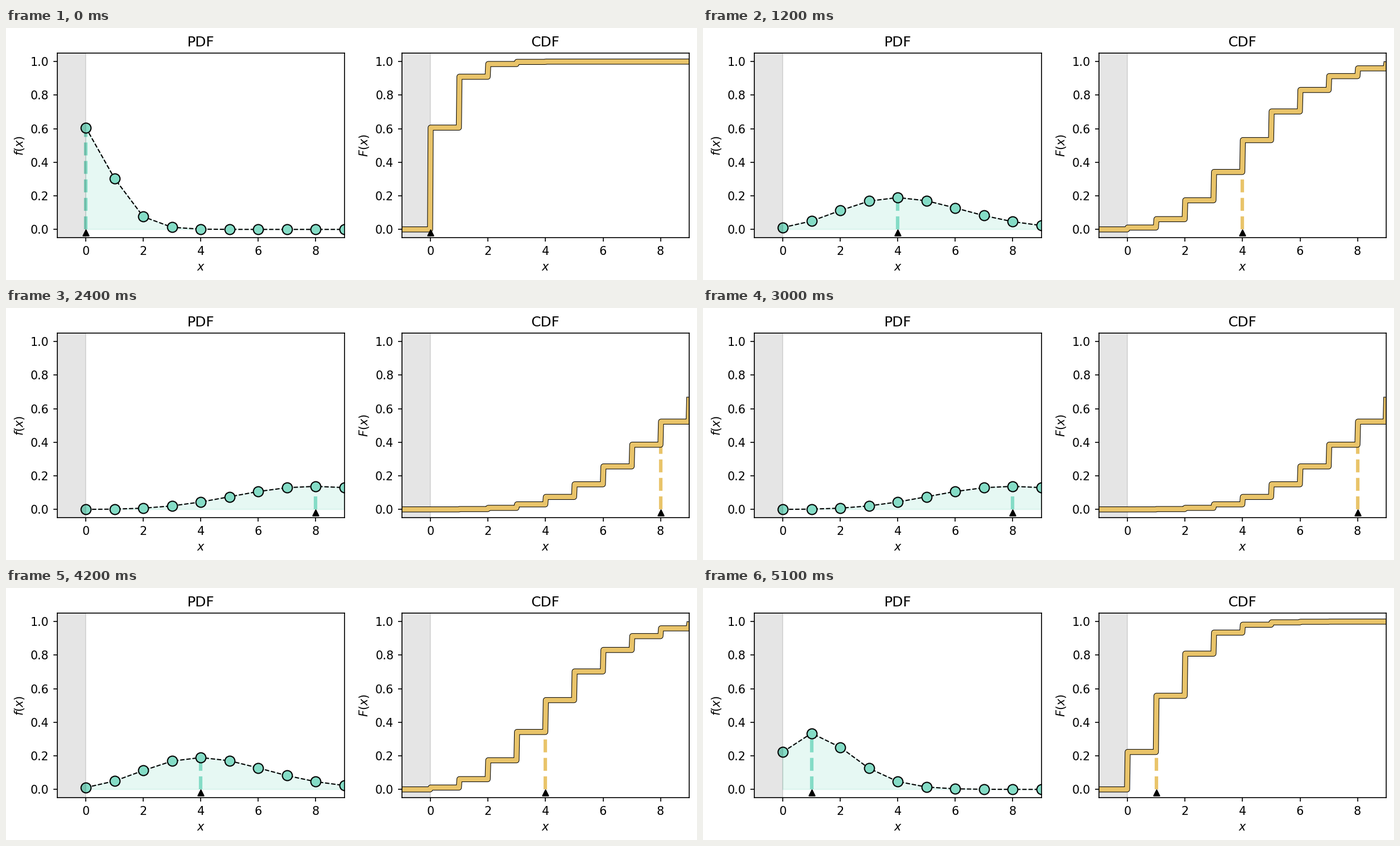
These frames come from a looping animation (1239x452 px, 5400 ms). A matplotlib script:

```python
import math

import matplotlib.pyplot as plt
import numpy as np
from matplotlib.animation import FuncAnimation

W, H, DPI = 1239, 452, 150
GREEN, GOLD = "#84DCC6", "#E9C46A"
PEAK = 9
FRAMES = 2 * PEAK
TOP, BOTTOM = 45.2, 376.3

ks = np.arange(PEAK + 1)
xs = np.linspace(-1, 9, 500)


def pmf(mu):
    return np.array([math.exp(-mu) * mu**k / math.factorial(k) for k in ks])


def make_axes(left, right, title, ylabel):
    ax = fig.add_axes([left / W, 1 - BOTTOM / H, (right - left) / W, (BOTTOM - TOP) / H])
    ax.set(xlim=(-1, 9), ylim=(-0.05, 1.05), title=title, xlabel="$x$", ylabel=ylabel)
    ax.set_xticks(range(0, 10, 2))
    ax.set_yticks(np.arange(6) / 5)
    ax.axvspan(-1, 0, color="k", alpha=0.1, zorder=2.1)
    return ax


def mode_marks(ax, color):
    stem, = ax.plot([], [], "--", color=color, lw=3, zorder=1.6)
    arrow = ax.scatter([0], [-0.02], s=25, marker="^", color="k", zorder=2.4)
    return stem, arrow


fig = plt.figure(figsize=((W + 1e-6) / DPI, (H + 1e-6) / DPI), dpi=DPI, facecolor="white")
pdf_ax = make_axes(91.7, 606.6, "PDF", "$f(x)$")
cdf_ax = make_axes(709.8, 1225.1, "CDF", "$F(x)$")

area, = pdf_ax.fill([0, 9, 9], [0, 0, 0], color=GREEN, alpha=0.2, lw=1, zorder=1.2)
curve, = pdf_ax.plot([], [], "k--", lw=1, zorder=1.5)
dots, = pdf_ax.plot([], [], "o", ms=8.6, mfc=GREEN, mec="k", mew=1, zorder=1.8)
rim, = cdf_ax.plot([], [], color="k", lw=5, zorder=2.2)
core, = cdf_ax.plot([], [], color=GOLD, lw=4, zorder=2.3)
pdf_marks = mode_marks(pdf_ax, GREEN)
cdf_marks = mode_marks(cdf_ax, GOLD)


def update(i):
    mode = PEAK - abs(PEAK - i)
    p = pmf(mode + 0.5)
    total = np.cumsum(p)
    steps = np.where(xs < 0, 0, total[np.maximum(np.floor(xs).astype(int), 0)])

    outline = np.column_stack([ks, p])
    area.set_xy(np.vstack([[0, 0], outline, [PEAK, 0]]))
    for line in (curve, dots):
        line.set_data(ks, p)
    for line in (rim, core):
        line.set_data(xs, steps)
    for (stem, arrow), height in ((pdf_marks, p[mode]), (cdf_marks, total[mode])):
        stem.set_data([mode, mode], [0, height])
        arrow.set_offsets([[mode, -0.02]])
    return area, curve, dots, rim, core, *pdf_marks, *cdf_marks


anim = FuncAnimation(fig, update, frames=FRAMES, interval=300, repeat=True,
                     repeat_delay=0, init_func=lambda: update(0))
plt.show()
```
